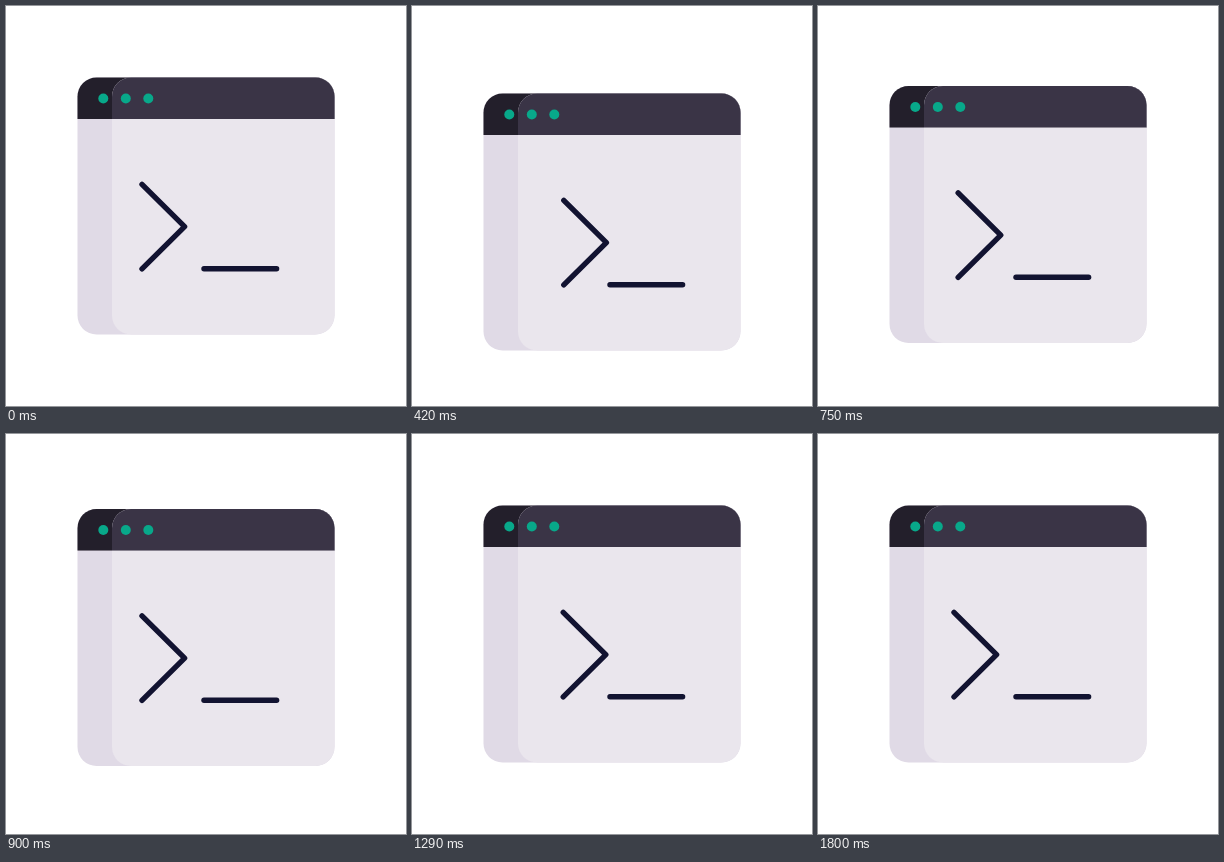
An HTML page that plays this animation: 400 by 400 pixels, repeating every 3.83 s.

```html
<!DOCTYPE html>
<html lang="en">
<head>
<meta charset="utf-8">
<title>Terminal</title>
<style>
  html, body { margin: 0; width: 100%; height: 100%; overflow: hidden; background: #fff; }
  svg { display: block; width: 100%; height: 100%; }
  .ink { fill: none; stroke: #121331; stroke-width: 5.4; stroke-linecap: round; stroke-linejoin: round; }
</style>
</head>
<body>
<svg viewBox="0 0 400 400">
  <defs>
    <clipPath id="frame"><rect x="71.5" y="71.5" width="257" height="257" rx="19"/></clipPath>
    <clipPath id="face"><rect x="106" y="71.5" width="222.5" height="257" rx="19"/></clipPath>
  </defs>
  <g id="window">
    <g clip-path="url(#frame)">
      <rect x="71" y="71" width="258" height="258" fill="#e0dae6"/>
      <rect x="71" y="71" width="258" height="42" fill="#231f2b"/>
    </g>
    <g clip-path="url(#face)">
      <rect x="105" y="71" width="224" height="258" fill="#eae6ed"/>
      <rect x="105" y="71" width="224" height="42" fill="#3a3446"/>
    </g>
    <g fill="#08a88a">
      <circle cx="97.3" cy="92.5" r="5"/>
      <circle cx="119.8" cy="92.5" r="5"/>
      <circle cx="142.3" cy="92.5" r="5"/>
    </g>
    <path id="prompt" class="ink" d="M136 178.3 178.6 220.6 136 262.9"/>
    <path id="cursor" class="ink" d="M198 262.7H270.6"/>
  </g>
</svg>
<script>
  const LOOP = 3830, STEP = 30, LAST = 60, TRAVEL = 16;
  const [panel, prompt, cursor] = ['window', 'prompt', 'cursor'].map(id => document.getElementById(id));

  const smooth = u => {
    u = Math.min(1, Math.max(0, u));
    return u * u * (3 - 2 * u);
  };
  // Rises until peak, then settles back to zero at end.
  const bump = (n, peak, end) =>
    TRAVEL * (n < peak ? smooth(n / peak) : 1 - smooth((n - peak) / (end - peak)));

  function draw(ms) {
    const n = Math.min(LAST, Math.floor((ms % LOOP) / STEP));
    const beat = n % 30;
    panel.setAttribute('transform', `translate(0 ${bump(n, 14, 37)})`);
    prompt.setAttribute('transform', `translate(${bump(beat, 15, 30)} 0)`);
    cursor.setAttribute('visibility', beat >= 5 && beat < 10 ? 'hidden' : 'visible');
  }

  const start = performance.now();
  function tick() {
    draw(performance.now() - start);
    requestAnimationFrame(tick);
  }
  tick();
</script>
</body>
</html>
```
